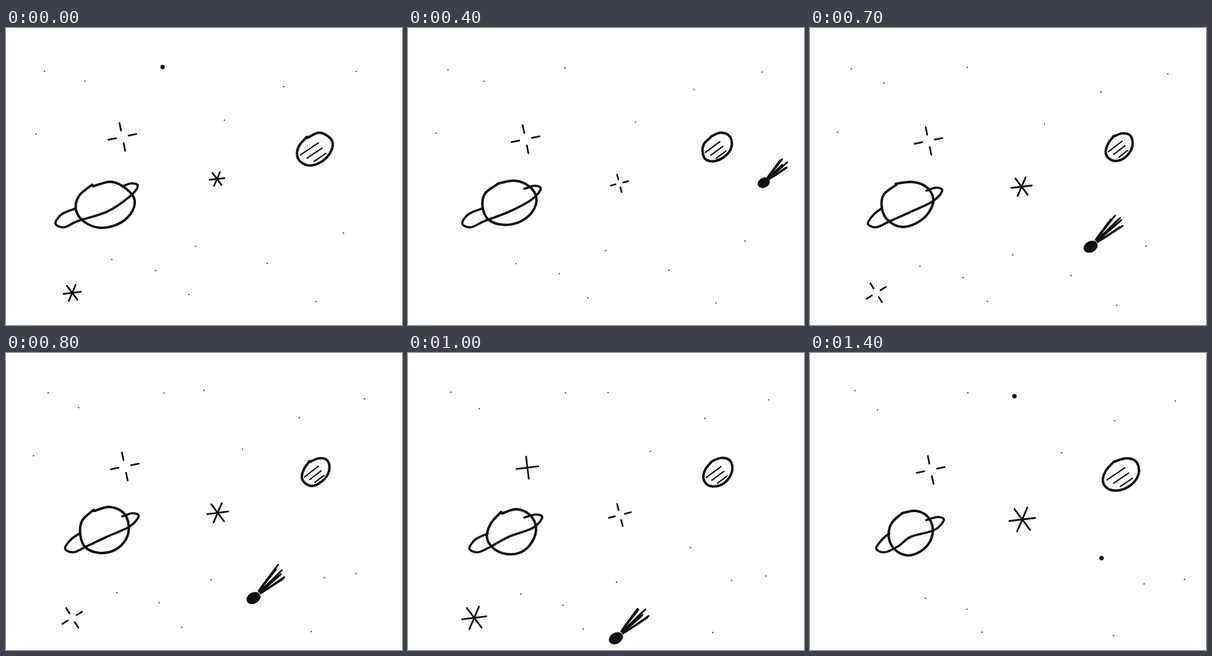
An HTML page with a canvas for the animation above (1500 ms loop, 640 by 480 pixels).

```html
<!DOCTYPE html>
<html lang="en">
<head>
<meta charset="utf-8">
<title>Doodled space</title>
<style>
html, body { margin: 0; overflow: hidden; background: #fefefe; }
canvas { display: block; }
</style>
</head>
<body>
<canvas id="sky" width="640" height="480"></canvas>
<script>
const ctx = document.getElementById('sky').getContext('2d');
const STEP = 100, STEPS = 15;
const { PI, sin, cos, min, max, floor } = Math;

// x and y at the start and end of the loop, then optional first, last and flaring step
const SPECKS = [
  [63, 71, 72, 60], [127, 85, 110, 91], [254, 64, 255, 64, 0, 14, 0], [566, 70, 590, 77],
  [449, 95, 492, 110], [353, 149, 406, 162], [48, 171, 40, 164, 0, 9], [546, 332, 540, 374, 0, 7],
  [307, 353, 348, 378, 0, 11], [171, 374, 186, 396], [241, 391, 253, 414], [295, 430, 277, 452],
  [423, 381, 421, 418, 0, 7], [500, 441, 490, 456], [480, 348, 540, 374, 8], [510, 345, 606, 366, 8],
  [305, 50, 330, 69, 8, 14, 14], [420, 275, 471, 331, 10, 14, 14]
];

// Looks change every two steps: o = open burst, + = cross, * = asterisk
const STARS = [
  { x: 188, y: 176, dx: 7, dy: 13, size: 23, grow: 0, turn: -0.2, looks: 'o+ooo+oo' },
  { x: 341, y: 244, dx: 2, dy: 25, size: 12, grow: 9, turn: -0.25, looks: '* o**o**' },
  { x: 107, y: 428, dx: 0, dy: 0, size: 14, grow: 8, turn: -0.55, looks: '** oo*o ' }
];

// Head of the comet, every two steps from step 2
const COMET = [[629, 199], [575, 250], [507, 311], [400, 396], [336, 461], [270, 526]];

const lerp = (a, b, u) => a + (b - a) * u;

// Seeded noise from -1 to 1
function noise(seed) {
  const n = sin(seed * 12.9898) * 43758.5453;
  return 2 * (n - floor(n)) - 1;
}

// Smooth open curve through all points
function curve(pts, width) {
  const at = i => pts[max(0, min(pts.length - 1, i))];
  ctx.lineWidth = width;
  ctx.beginPath();
  ctx.moveTo(...pts[0]);
  for (let i = 0; i < pts.length - 1; i++) {
    const [a, b, c, d] = [at(i - 1), at(i), at(i + 1), at(i + 2)];
    ctx.bezierCurveTo(b[0] + (c[0] - a[0]) / 6, b[1] + (c[1] - a[1]) / 6,
      c[0] - (d[0] - b[0]) / 6, c[1] - (d[1] - b[1]) / 6, c[0], c[1]);
  }
  ctx.stroke();
}

// Hand-drawn oval whose ends do not quite meet; skew leans it to the right
function oval(cx, cy, rx, ry, skew, seed) {
  const pts = [];
  for (let i = 0; i <= 10; i++) {
    const angle = -2 + i * PI / 5;
    const r = 1 + 0.04 * noise(seed + i);
    pts.push([cx + rx * r * cos(angle), cy + ry * r * sin(angle - skew)]);
  }
  curve(pts, 4);
}

function drawSpecks(step, p) {
  SPECKS.forEach(([x0, y0, x1, y1, first = 0, last = 14, flare = -1], i) => {
    if (step < first || step > last) return;
    const x = lerp(x0, x1, p) + noise(i + step * 31);
    const y = lerp(y0, y1, p) + noise(i + step * 47);
    ctx.fillStyle = step === flare ? '#111' : '#555';
    ctx.beginPath();
    ctx.arc(x, y, step === flare ? 3.6 : 1.2, 0, 2 * PI);
    ctx.fill();
  });
}

function drawPlanet(step, p) {
  const cx = 160 + 5 * p + 6 * sin(2 * PI * step / 9);
  const cy = 286 + 5 * p - 5 * max(0, sin(PI * step / 10));
  const rx = 48 - 13 * p;
  oval(cx, cy, rx, 36.5, 0.1, step * 17);

  const left = 80 + 27 * p, right = 215 + 2 * noise(step);
  const tip = 256 + 14 * p;
  curve([
    [cx - rx, 292], [left + 10, 301], [left, 316], [left + 14, 322], [left + 36, 312],
    [163, 297], [right - 15, tip + 18 - 2 * p], [right, tip], [right - 10, tip - 5], [188, tip]
  ], 3.6);
}

function drawMoon(step, p) {
  const dip = sin(PI * p);
  const cx = 499 + 4 * p * p, cy = 196 - 4 * dip;
  const rx = 29 - 7 * dip, ry = 26 - 3.5 * dip;
  oval(cx, cy, rx, ry, 0.3, step * 23);
  for (let i = 0; i < 3; i++) {
    const x = cx + rx * (0.38 * i - 0.8), y = cy + ry * (0.35 + 0.2 * i);
    const length = 1 - 0.17 * i;
    curve([[x, y], [x + rx * length, y - 0.75 * ry * length]], 2.2);
  }
}

function drawStar({ x, y, dx, dy, size, grow, turn, looks }, step, p) {
  const look = looks[step >> 1];
  if (look === ' ') return;
  const rays = look === '*' ? 6 : 4;
  const open = look === 'o';
  const outer = (size + grow * p) * (look === '+' ? 0.78 : 1);
  const inner = open ? outer * 0.45 : 0;
  const cx = x + dx * p, cy = y + dy * p;
  for (let i = 0; i < rays; i++) {
    const angle = (open ? turn : -0.12) + i * 2 * PI / rays;
    curve([inner, outer].map(r => [cx + r * cos(angle), cy + r * sin(angle)]), 2.8);
  }
}

function drawComet(step) {
  const k = (step - 2) / 2, i = floor(k);
  if (i < 0 || i > COMET.length - 2) return;
  const [x, y] = COMET[i].map((v, axis) => lerp(v, COMET[i + 1][axis], k - i));
  const size = min(1, (step - 1) / 4);

  // Tail scribbled to and fro between the head and a fan of tips
  const tail = [];
  for (let n = 0; n < 12; n++) {
    const angle = -0.76 + 0.19 * cos(n * 0.55);
    const r = size * (n % 2 ? 60 + 7 * noise(n + step) : 14);
    tail.push([x + r * cos(angle), y + r * sin(angle)]);
  }
  curve(tail, 2.8);

  ctx.fillStyle = '#111';
  ctx.beginPath();
  ctx.ellipse(x, y, 6 + 6 * size, 5 + 4 * size, -0.5, 0, 2 * PI);
  ctx.fill();
}

function draw(step) {
  const p = step / (STEPS - 1);
  ctx.fillStyle = '#fefefe';
  ctx.fillRect(0, 0, 640, 480);
  ctx.strokeStyle = '#111';
  ctx.lineCap = ctx.lineJoin = 'round';
  drawSpecks(step, p);
  drawPlanet(step, p);
  drawMoon(step, p);
  STARS.forEach(star => drawStar(star, step, p));
  drawComet(step);
}

function tick() {
  draw(floor(performance.now() / STEP) % STEPS);
  requestAnimationFrame(tick);
}
tick();
</script>
</body>
</html>
```
